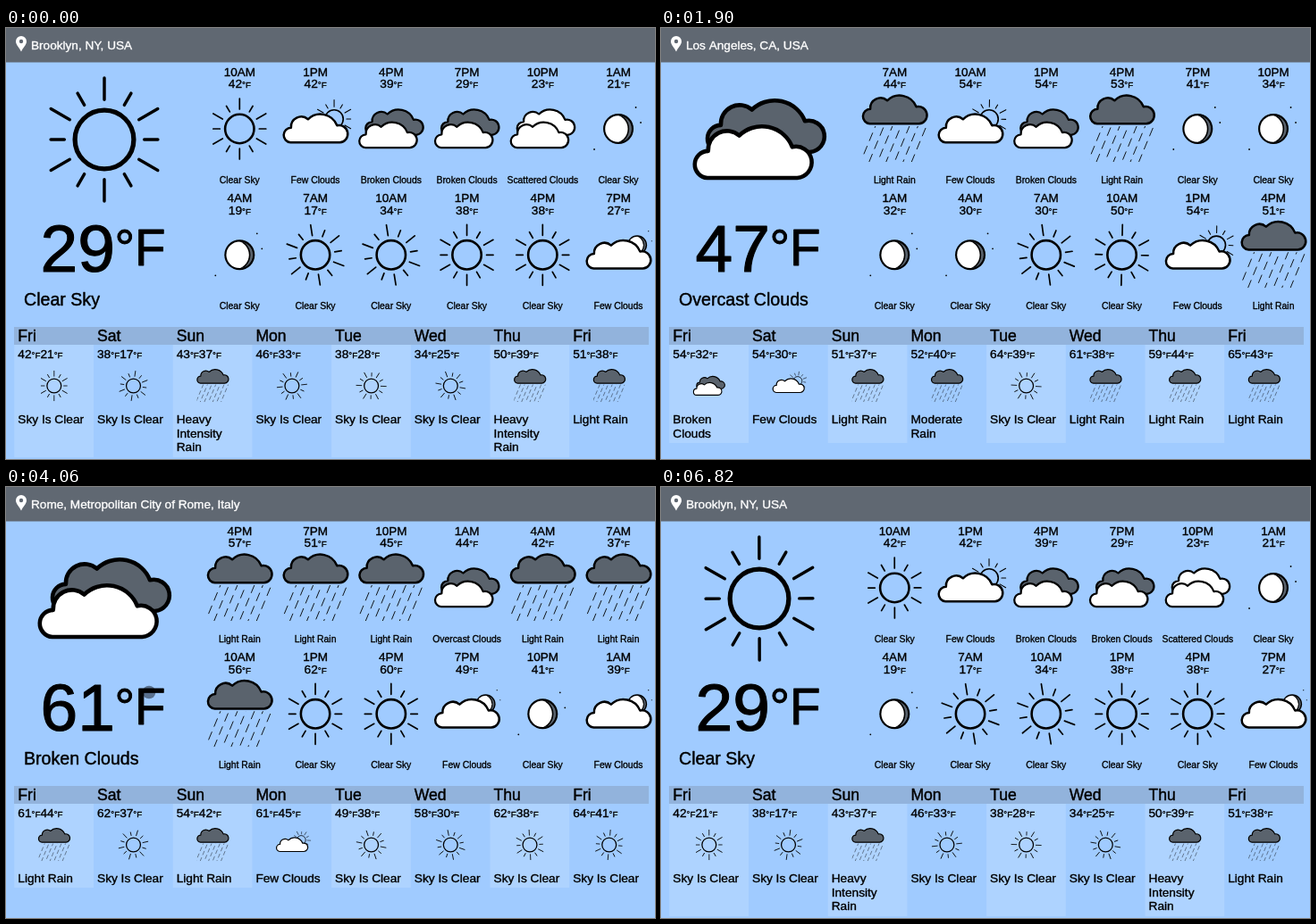
An HTML page with a canvas for the animation above (6840 ms loop, 726 by 483 pixels).

```html
<!DOCTYPE html>
<html lang="en">
<head>
<meta charset="utf-8">
<title>Weather search</title>
<style>
html, body { margin: 0; width: 726px; height: 483px; overflow: hidden; background: #a0cbff; }
canvas { display: block; }
</style>
</head>
<body>
<canvas id="stage" width="726" height="483"></canvas>
<script>
const g = document.getElementById('stage').getContext('2d');
const LOOP = 6840, SKY = '#a0cbff', DARK = '#5a636d', PALE = '#f7f9ff';
const FONT = '"Liberation Sans", Arial, sans-serif';
const CLEAR = 'Clear Sky', SUNNY = 'Sky Is Clear', FEW = 'Few Clouds', BROKEN = 'Broken Clouds';
const LIGHT = 'Light Rain', HEAVY = 'Heavy Intensity Rain', OVERCAST = 'Overcast Clouds';
const DAYS = ['Fri', 'Sat', 'Sun', 'Mon', 'Tue', 'Wed', 'Thu', 'Fri'];

// hours: first hour, then temperatures and conditions; days: high/low pairs and conditions
const reports = [
  { temp: 29, sky: CLEAR, first: 10, zero: 0,
    temps: '42 42 39 29 23 21 19 17 34 38 38 27',
    skies: [CLEAR, FEW, BROKEN, BROKEN, 'Scattered Clouds', CLEAR, CLEAR, CLEAR, CLEAR, CLEAR, CLEAR, FEW],
    range: '42/21 38/17 43/37 46/33 38/28 34/25 50/39 51/38',
    daily: [SUNNY, SUNNY, HEAVY, SUNNY, SUNNY, SUNNY, HEAVY, LIGHT] },
  { temp: 47, sky: OVERCAST, first: 7, zero: 1755,
    temps: '44 54 54 53 41 34 32 30 30 50 54 51',
    skies: [LIGHT, FEW, BROKEN, LIGHT, CLEAR, CLEAR, CLEAR, CLEAR, CLEAR, CLEAR, FEW, LIGHT],
    range: '54/32 54/30 51/37 52/40 64/39 61/38 59/44 65/43',
    daily: [BROKEN, FEW, LIGHT, 'Moderate Rain', SUNNY, LIGHT, LIGHT, LIGHT] },
  { temp: 61, sky: BROKEN, first: 16, zero: 2935,
    temps: '57 51 45 44 42 37 56 62 60 49 41 39',
    skies: [LIGHT, LIGHT, LIGHT, OVERCAST, LIGHT, LIGHT, LIGHT, CLEAR, CLEAR, FEW, CLEAR, FEW],
    range: '61/44 62/37 54/42 61/45 49/38 58/30 62/38 64/41',
    daily: [LIGHT, SUNNY, LIGHT, FEW, SUNNY, SUNNY, SUNNY, SUNNY] }
];
const searches = [
  { move: 440, open: 860, type: 1060, step: 80, drop: 1300, pick: 1560, load: 1640, query: 'LA', place: 'Los Angeles, CA, USA', report: 1 },
  { move: 2120, open: 2420, type: 2560, step: 60, drop: 2940, pick: 3200, load: 3280, query: 'Rome', place: 'Rome, Metropolitan City of Rome, Italy', report: 2 },
  { move: 4060, open: 4520, type: 5000, step: 75, drop: 5640, pick: 6020, load: 6100, query: 'Brooklyn', place: 'Brooklyn, NY, USA', report: 0 }
];

const cloudPath = new Path2D('M8.5 31A8.26 8.26 0 0 1 9 14.5A11.5 11.5 0 0 1 28 5A20 20 0 0 1 60.5 12A9.65 9.65 0 1 1 63.5 31Z');

// A thin outline gives the letters a slightly stronger weight.
function text(str, x, y, size, { align = 'left', weight = '', color = '#000' } = {}) {
  g.font = `${weight} ${size}px ${FONT}`;
  g.textAlign = align;
  g.fillStyle = g.strokeStyle = color;
  g.lineWidth = .2 + size * .012;
  g.lineJoin = 'round';
  g.fillText(str, x, y);
  g.strokeText(str, x, y);
  return g.measureText(str).width;
}

function temperature(value, x, y) {
  const w = text(value, x, y, 13.7);
  return w + text('°F', x + w, y, 9.8);
}

function rect(color, x, y, w, h) {
  g.fillStyle = color;
  g.fillRect(x, y, w, h);
}

function disc(color, x, y, r) {
  g.fillStyle = color;
  g.beginPath();
  g.arc(x, y, r, 0, 7);
  g.fill();
}

function line(x1, y1, x2, y2) {
  g.beginPath();
  g.moveTo(x1, y1);
  g.lineTo(x2, y2);
  g.stroke();
}

function placed(x, y, scale, draw) {
  g.save();
  g.translate(x, y);
  g.scale(scale, scale);
  draw();
  g.restore();
}

function cloud(x, y, scale, fill) {
  placed(x, y, scale, () => {
    g.fillStyle = fill;
    g.strokeStyle = '#000';
    g.lineWidth = 2.5;
    g.fill(cloudPath);
    g.stroke(cloudPath);
  });
}

function sun(angle) {
  g.save();
  g.strokeStyle = '#000';
  g.lineWidth = 2.6;
  g.beginPath();
  g.arc(0, 0, 16.2, 0, 7);
  g.stroke();
  g.lineWidth = 1.7;
  g.lineCap = 'round';
  g.rotate(angle * Math.PI / 180);
  for (let i = 0; i < 12; i++) {
    line(0, -22, 0, i % 2 ? -29.5 : -34);
    g.rotate(Math.PI / 6);
  }
  g.restore();
}

function moon() {
  disc('#000', 0, 0, 17);
  disc(DARK, 0, 0, 14.8);
  g.save();
  g.beginPath();
  g.arc(0, 0, 14.8, 0, 7);
  g.clip();
  disc('#000', -5.5, 0, 17.6);
  disc('#fff', -5.5, 0, 16);
  g.restore();
  disc('#000', 19.5, -24, .9);
  disc('#000', 25, -7, .9);
  disc('#000', -27, 23, .9);
}

function rain(t) {
  g.save();
  g.beginPath();
  g.rect(-36, -3, 72, 40);
  g.clip();
  g.strokeStyle = '#000';
  g.lineWidth = .9;
  g.setLineDash([10, 6]);
  for (let i = 0; i < 7; i++) {
    g.lineDashOffset = i * 6.3 % 16 - t * .03;
    const x = -21 + i * 9.5;
    line(x, -4, x - 17, 37);
  }
  g.restore();
}

function icon(sky, x, y, scale, angle, t, night = false) {
  placed(x, y, scale, () => {
    if (/Clear/.test(sky)) {
      night ? moon() : sun(angle);
    } else if (/Rain/.test(sky)) {
      rain(t);
      cloud(-36.2, -36.7, 1, DARK);
    } else if (sky === FEW) {
      placed(21, -11, night ? .65 : .63, () => night ? moon() : sun(angle));
      cloud(-36.2, -15.7, 1, '#fff');
    } else {
      cloud(-29.3, -21, .9, /Scat/.test(sky) ? '#fff' : DARK);
      cloud(-36.3, -6.7, .9, '#fff');
    }
  });
}

function wrap(str, width) {
  const lines = [];
  for (const word of str.split(' ')) {
    const last = lines[lines.length - 1];
    const joined = last + ' ' + word;
    if (last && g.measureText(joined).width < width) lines[lines.length - 1] = joined;
    else lines.push(word);
  }
  return lines;
}

function drawReport(r, t, spin) {
  icon(r.sky, 110, 125, 2.03, spin, t);
  const w = text(r.temp, 38.5, 272.5, 75);
  text('°F', 38 + w, 266, 56.5);
  text(r.sky, 20, 311, 19.6);

  r.temps.split(' ').forEach((temp, i) => {
    const hour = (r.first + i * 3) % 24;
    const x = 261.3 + i % 6 * 84.75, y = i < 6 ? 0 : 141.3;
    const center = { align: 'center' };
    text((hour % 12 || 12) + (hour < 12 ? 'AM' : 'PM'), x, 54 + y, 13.5, center);
    temperature(temp, x - 12.5, 67.3 + y);
    icon(r.skies[i], x, 113 + y, 1, spin - (i % 9 > 6 ? 9 : 0), t, hour > 18 || hour < 6);
    text(r.skies[i], x, 174 + y, 10.4, center);
  });

  g.font = `13.7px ${FONT}`;
  const labels = r.daily.map(sky => wrap(sky, 80));
  const height = 94 + 16 * (Math.max(...labels.map(l => l.length)) - 1);
  rect('#92b3dc', 9, 335, 710, 20);
  r.range.split(' ').forEach((range, i) => {
    const x = 9.3 + i * 88.7;
    if (i % 2 === 0) rect('#aed3ff', x, 355, 88.7, height);
    text(DAYS[i], x + 4, 351, 17.6);
    const [high, low] = range.split('/');
    const used = temperature(high, x + 4, 370);
    temperature(low, x + 4 + used, 370);
    icon(r.daily[i], x + 44.5, 401, .49, spin + i * 8, t);
    labels[i].forEach((label, k) => text(label, x + 4, 443 + k * 15.7, 13.7));
  });
}

function pin(color, hole) {
  g.fillStyle = color;
  g.beginPath();
  g.moveTo(17, 26.5);
  g.bezierCurveTo(15, 22, 11, 19, 11, 15);
  g.arc(17, 15, 6, Math.PI, 0);
  g.bezierCurveTo(23, 19, 19, 22, 17, 26.5);
  g.fill();
  disc(hole, 17, 15, 2.2);
}

function drawHeader(t, search, place) {
  if (!search) {
    rect('#606872', 0, 0, 726, 38.5);
    pin('#fff', '#606872');
    text(place, 28, 23.5, 13.6, { color: '#fff' });
    return;
  }
  if (t >= search.drop) {
    rect('rgba(245,247,250,.88)', 0, 38, 726, 24);
    rect('#444', 0, 62, 726, 1);
    text(search.place, 10, 53.5, 9.1, { weight: 'bold' });
  }
  rect(PALE, 0, 0, 726, 38);
  rect('#555', 0, 38, 726, 1);
  pin('#000', PALE);
  const count = Math.max(0, Math.floor((t - search.type) / search.step) + 1);
  const w = text(search.query.slice(0, count), 28, 23.6, 13.3);
  if (count && t % 800 < 400) rect('#000', 28 + w, 11.5, 1, 16);
}

const ease = p => p * p * (3 - 2 * p);

function drawPointer(t, s) {
  const glide = (from, to, a, b) => {
    const p = ease(Math.min(1, Math.max(0, (t - from) / (to - from))));
    disc('rgba(0,0,0,.45)', a[0] + (b[0] - a[0]) * p, a[1] + (b[1] - a[1]) * p, 7.3);
  };
  const field = [312, 23];
  if (t >= s.move && t < s.type - 100) glide(s.move, s.open - 60, [160, 230], field);
  else if (t >= s.drop + 20 && t < s.pick + 80) glide(s.drop + 20, s.pick - 100, field, [157, 49]);
}

function draw(t) {
  const loaded = searches.filter(s => t >= s.load).pop();
  const picked = searches.filter(s => t >= s.pick).pop();
  const active = searches.find(s => t >= s.open && t < s.pick);
  const report = reports[loaded ? loaded.report : 0];
  const zero = loaded && loaded.report === 0 ? LOOP : report.zero;
  rect(SKY, 0, 0, 726, 483);
  drawReport(report, t, (t - zero) * .008);
  drawHeader(t, active, (picked || searches[2]).place);
  searches.forEach(s => drawPointer(t, s));
}

const start = performance.now();
function frame() {
  draw((performance.now() - start) % LOOP);
  requestAnimationFrame(frame);
}
frame();
</script>
</body>
</html>
```
